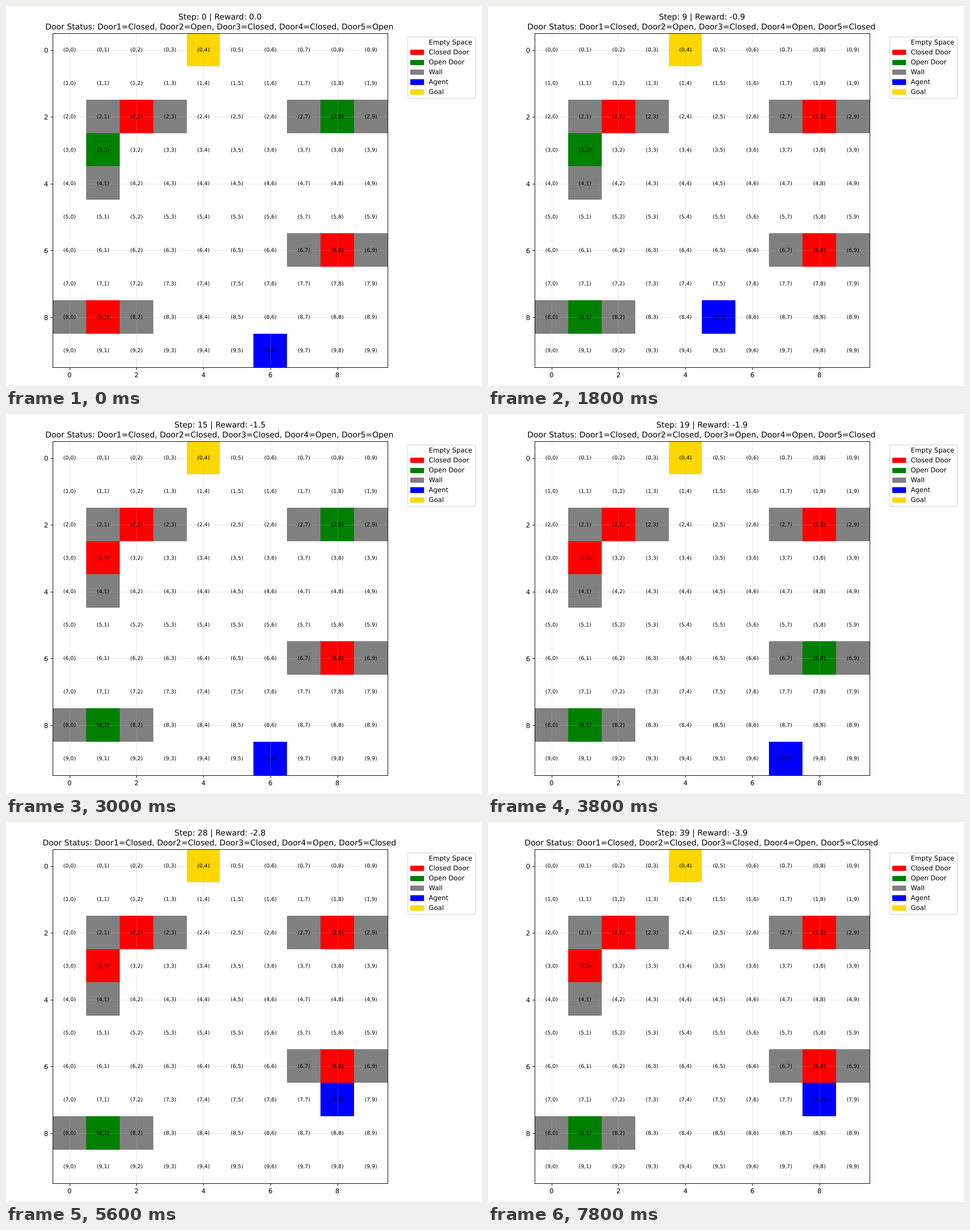
Write a matplotlib script that moves like this. It is 837x669 px and loops after 8 s.

```python
import numpy as np
import matplotlib.pyplot as plt
from matplotlib.animation import FuncAnimation
from matplotlib.colors import ListedColormap
from matplotlib.patches import Patch
from matplotlib.patheffects import Normal
from matplotlib.text import Text

W, H = 837, 669
DPI = H / 8
N = 10
STEP_MS = 200

EMPTY, CLOSED, OPEN, WALL, AGENT, GOAL = range(6)
COLORS = ["white", "red", "green", "gray", "blue", "gold"]
LABELS = ["Empty Space", "Closed Door", "Open Door", "Wall", "Agent", "Goal"]

DOORS = [(2, 2), (3, 1), (6, 8), (8, 1), (2, 8)]
WALLS = [(2, 1), (2, 3), (2, 7), (2, 9), (4, 1),
         (6, 7), (6, 9), (8, 0), (8, 2)]
GOAL_CELL = (0, 4)
START = (9, 6)

# One move per step; a dot is a blocked move.
MOVES = "LR.LRLRLU" "DRUDLR" "UDR.LUUR" "RLRLR" "LRLRL" "RLR.LR"
DELTA = {"U": (-1, 0), "D": (1, 0), "L": (0, -1), "R": (0, 1), ".": (0, 0)}

# Numbers of the open doors at each step.
OPEN_DOORS = ("25 2 24 4 25 4 24 2 45 24 4 24 4 - 4 45 4 - 4 34 "
              "4 5 24 3 4 - 4 24 4 - 24 4 4 24 4 - 45 4 - 4").split()


def walk():
    path = [START]
    for move in MOVES:
        (r, c), (dr, dc) = path[-1], DELTA[move]
        path.append((r + dr, c + dc))
    return path


PATH = walk()


def grid_at(step):
    grid = np.full((N, N), EMPTY)
    for cell in WALLS:
        grid[cell] = WALL
    for i, cell in enumerate(DOORS, 1):
        grid[cell] = OPEN if str(i) in OPEN_DOORS[step] else CLOSED
    grid[GOAL_CELL] = GOAL
    grid[PATH[step]] = AGENT
    return grid


def title_at(step):
    status = ", ".join(
        f"Door{i}={'Open' if str(i) in OPEN_DOORS[step] else 'Closed'}"
        for i in range(1, len(DOORS) + 1))
    return f"Step: {step} | Reward: {-step / 10 if step else 0:.1f}\nDoor Status: {status}"


plt.rcParams["font.family"] = "DejaVu Sans"
plt.rcParams["text.hinting"] = "none"
fig = plt.figure(figsize=(W / DPI + 1e-9, H / DPI), dpi=DPI, facecolor="white")
left, right, top, bottom = 82.3, 671.0, 48.2, 636.3
ax = fig.add_axes([left / W, 1 - bottom / H, (right - left) / W, (bottom - top) / H])

image = ax.imshow(grid_at(0), cmap=ListedColormap(COLORS), vmin=-0.5, vmax=5.5,
                  aspect="auto", interpolation="nearest")
ax.set_xticks(range(0, N, 2))
ax.set_yticks(range(0, N, 2))
ax.grid(True, alpha=0.3)
for r in range(N):
    for c in range(N):
        ax.text(c, r, f"({r},{c})", ha="center", va="center", fontsize=8)
ax.legend(handles=[Patch(color=col, label=lab) for col, lab in zip(COLORS, LABELS)],
          bbox_to_anchor=(1.05, 1), loc="upper left")
title = ax.set_title(title_at(0), linespacing=1.33)

# Draw text as outlines so that glyphs keep their fractional positions.
for text in fig.findobj(Text):
    text.set_path_effects([Normal()])


def update(step):
    image.set_data(grid_at(step))
    title.set_text(title_at(step))
    return image, title


anim = FuncAnimation(fig, update, frames=len(PATH), interval=STEP_MS,
                     repeat=True, repeat_delay=0, blit=False)
plt.show()
```
